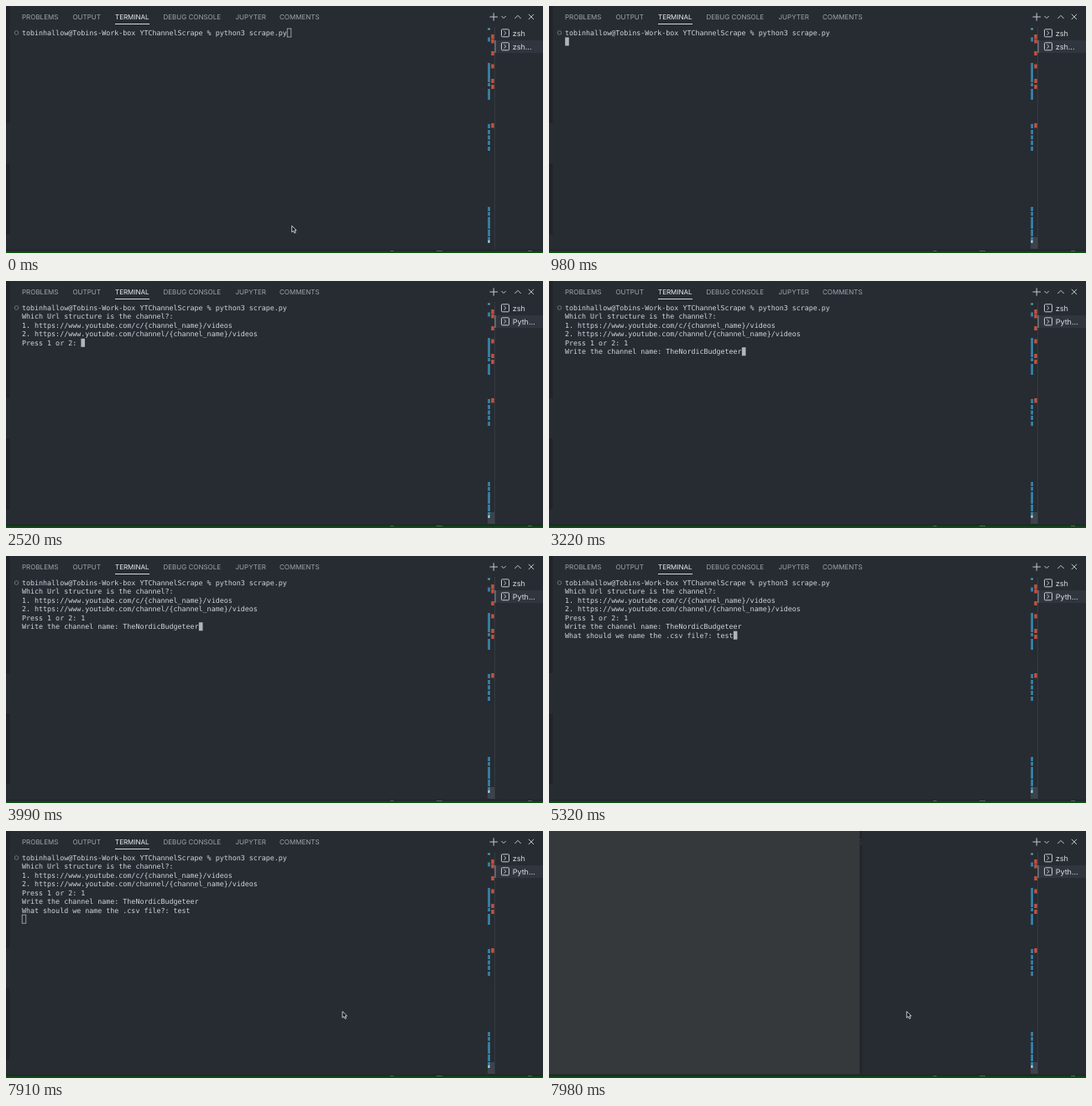
Write an HTML page that moves like this. It is 640 px wide and 295 px high and loops after 8 s.

```html
<!DOCTYPE html>
<html lang="en">
<head>
<meta charset="utf-8">
<title>Terminal session</title>
<style>
  html, body { margin: 0; width: 100%; height: 100%; overflow: hidden; background: #272c33; }
  svg { display: block; width: 640px; height: 295px; }
  text { white-space: pre; text-rendering: geometricPrecision; }
  .tabs { font: 8px Inter, Roboto, sans-serif; fill: #a0a5ac; }
  .tabs .on { fill: #eceef0; }
  .side { font: 9px Inter, Roboto, sans-serif; fill: #d9dce0; }
  .term { font: 8.33px "DejaVu Sans Mono", "Liberation Mono", monospace; fill: #d0d4da; }
  .icon { fill: none; stroke: #c3c7cc; stroke-width: 1; }
</style>
</head>
<body>
<svg viewBox="0 0 640 295">
  <rect width="640" height="295" fill="#272c33"/>
  <path d="M0 0h4.5v140H0zM0 188h4.5v85H0z" fill="#20242a"/>

  <g class="tabs">
    <text x="19" y="16">PROBLEMS</text>
    <text x="79.5" y="16">OUTPUT</text>
    <text x="130" y="16" class="on">TERMINAL</text>
    <text x="187.5" y="16">DEBUG CONSOLE</text>
    <text x="273.5" y="16">JUPYTER</text>
    <text x="326" y="16">COMMENTS</text>
  </g>
  <path d="M130 21.5h41" stroke="#d5d8dc"/>

  <g class="icon">
    <path d="M576.5 13h9.5M581.2 8.3v9.4M590.5 12l2.6 2.6 2.6-2.6M606.3 15l3.7-3.7 3.7 3.7M622.8 9.8l6.2 6.2M629 9.8l-6.2 6.2"/>
  </g>

  <path d="M582.5 25v268" stroke="#363b42"/>
  <rect x="583" y="41" width="57" height="15" fill="#31363e"/>
  <path d="M583 41v15" stroke="#8f959d"/>
  <g class="icon">
    <g id="shell">
      <rect x="590.5" y="27.8" width="9" height="9" rx="1"/>
      <path d="M593.5 30l2.4 2.3-2.4 2.3"/>
    </g>
    <use href="#shell" y="16"/>
  </g>
  <g class="side">
    <text x="603.7" y="35.7">zsh</text>
    <text x="603.7" y="51.7" id="proc"></text>
  </g>

  <rect id="slider" x="574" y="276" width="8" height="14" fill="#3d434b"/>
  <g id="marks"></g>

  <circle cx="12.5" cy="32" r="2.3" fill="none" stroke="#737981" stroke-width=".9"/>
  <g class="term" id="lines"></g>
  <rect id="caret" width="4.6" height="10"/>

  <g id="cover">
    <rect width="371" height="295" fill="#35393c"/>
    <path d="M371 0v295" stroke="#1b1f24"/>
    <path d="M372.5 0v295" stroke="#22272d"/>
  </g>

  <path id="mouse" d="M0 0v7.6l1.8-1.6 1.3 2.7 1.4-.6-1.3-2.7h2.3z" fill="#111" stroke="#f2f2f2" stroke-width=".8"/>

  <rect y="290.5" width="640" height="2.5" fill="#23282d"/>
  <path d="M458 293h4M513 293h7M622 293h5" stroke="#8b9096"/>
  <rect y="293" width="640" height="2" fill="#09500f"/>
</svg>
<script>
const LOOP = 8000, CHAR = 5.016, ROW = 10.45, LEFT = 19;
const $ = id => document.getElementById(id);
const NS = "http://www.w3.org/2000/svg";
const add = (parent, tag, attrs) => {
  const el = document.createElementNS(NS, tag);
  for (const k in attrs) el.setAttribute(k, attrs[k]);
  return parent.appendChild(el);
};

// Overview ruler: [top, height] pairs
const ruler = (x, width, fill, spans) => spans.forEach(([y, height]) =>
  add($("marks"), "rect", { x, y, width, height, fill }));
ruler(574.3, 2.6, "#3787ae", [
  [37.5, 5], [68, 23], [92, 4], [99, 13], [141, 5], [148, 5], [154.5, 5], [161, 5], [168, 5],
  [240, 5], [246, 4.5], [252, 14], [267, 8], [276, 5]
]);
ruler(574.3, 2.6, "#55b5b0", [[26.5, 2]]);
ruler(574.5, 2, "#b9d7e2", [[280, 3]]);
ruler(578.3, 3.4, "#c4523f", [
  [34, 5], [39.5, 5], [54, 5], [69.5, 5], [87, 5], [94, 5], [140, 5.5]
]);

// Output history: [time, text], where "\n" starts a new row
const script = [
  [0, "tobinhallow@Tobins-Work-box YTChannelScrape % python3 scrape.py"],
  [910, "\n"],
  [1400, "Which Url structure is the channel?:\n" +
         "1. https://www.youtube.com/c/{channel_name}/videos\n" +
         "2. https://www.youtube.com/channel/{channel_name}/videos\n" +
         "Press 1 or 2: "],
  [2590, "1"],
  [2800, "\nWrite the channel name: "],
  [3220, "TheNordicBudgeteer"],
  [4060, "\nWhat should we name the .csv file?: "],
  [4550, "t"], [4760, "e"], [5040, "s"], [5320, "t"],
  [5810, "\n"]
];
const rows = Array.from({ length: 8 }, (_, i) =>
  add($("lines"), "text", { x: LEFT, y: 35 + i * ROW }));

const FOCUS = 490, BLUR = 7420, SWIPE = 7980;
const show = (el, on) => el.setAttribute("visibility", on ? "visible" : "hidden");

// Pointer tip: [time, x, y]
const leave = [[0, 340.7, 262.5], [70, 340.7, 262.5], [490, 346, 296]];
const enter = [[7420, 392, 222], [7630, 401, 215.5], [7910, 401, 215.5], [7980, 426.3, 215.5]];
function along(path, t) {
  const i = path.findIndex(p => p[0] > t);
  if (i < 0) return path[path.length - 1].slice(1);
  const [t0, x0, y0] = path[i - 1], [t1, x1, y1] = path[i];
  const k = (t - t0) / (t1 - t0);
  return [x0 + (x1 - x0) * k, y0 + (y1 - y0) * k];
}

function draw(t) {
  const text = script.filter(s => s[0] <= t).map(s => s[1]).join("").split("\n");
  rows.forEach((el, i) => {
    const line = text[i] || "";
    if (el.textContent !== line) el.textContent = line;
  });

  const focused = t >= FOCUS && t < BLUR;
  const last = text.length - 1, caret = $("caret");
  caret.setAttribute("x", LEFT + .2 + text[last].length * CHAR);
  caret.setAttribute("y", 27 + last * ROW);
  caret.setAttribute("fill", focused ? "#b0b5bc" : "none");
  caret.setAttribute("stroke", focused ? "none" : "#b0b5bc");
  caret.setAttribute("stroke-width", ".8");

  $("proc").textContent = t < 1190 ? "zsh..." : "Pyth...";
  show($("slider"), t >= FOCUS);
  show($("cover"), t >= SWIPE);

  show($("mouse"), t < FOCUS || t >= BLUR);
  const [x, y] = along(t < BLUR ? leave : enter, Math.floor(t / 70) * 70);
  $("mouse").setAttribute("transform", `translate(${x} ${y})`);
}

const start = performance.now();
function tick() {
  draw((performance.now() - start) % LOOP);
  requestAnimationFrame(tick);
}
tick();
</script>
</body>
</html>
```
